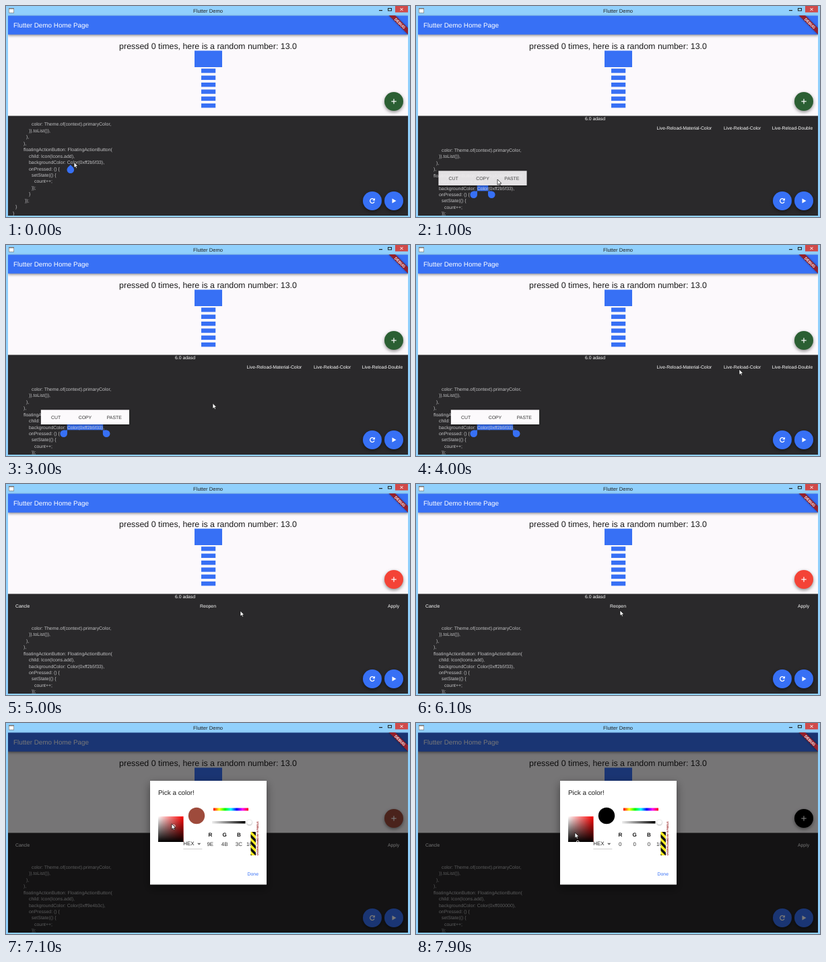
These frames come from a looping animation (600x314 px, 8000 ms). An HTML page with a canvas:

```html
<!DOCTYPE html>
<html>
<head>
<meta charset="utf-8">
<style>
html, body { margin: 0; overflow: hidden; }
canvas { display: block; }
</style>
</head>
<body>
<canvas id="c" width="600" height="314"></canvas>
<script>
const g = document.getElementById('c').getContext('2d');
const BLUE = '#3770f5', FRAME = '#91d0fc', SANS = '"Liberation Sans", Arial, sans-serif';
const PITCH = 9.43, RED = [0.78, 0.957];

// [time, x, y] points, linear in between
const MOUSE = [[0, 101, 232.5], [900, 101, 232.5], [1000, 121, 258], [1300, 113, 280], [1700, 133, 281],
  [1800, 135, 281], [2000, 144, 281], [2200, 146, 281], [2600, 146, 281], [3400, 468, 190], [3500, 470, 190],
  [3800, 480, 185], [4400, 480, 185], [5200, 304, 190], [5500, 303, 188], [6100, 303, 188], [6200, 300, 200.5],
  [6300, 297, 198], [6700, 252, 144], [7100, 246, 150], [7400, 246, 150], [7900, 236, 163]];
// saturation and value while dragging in the palette
const PICK = [[6700, ...RED], [7100, 0.62, 0.62], [7400, 0.62, 0.62], [7800, 0.38, 0], [8000, 0.38, 0]];

const CODE = [
  [38, 'color: Theme.of(context).primaryColor,'], [34, ')).toList()),'], [30, '),'], [26, '),'],
  [26, 'floatingActionButton: FloatingActionButton('], [34, 'child: Icon(Icons.add),'],
  [34, 'backgroundColor: Color(0xff'], [34, 'onPressed: () {'], [38, 'setState(() {'], [42, 'count++;'],
  [38, '});'], [34, '}'], [28, '});'], [14, '}'], [10, '}']];

function along(path, t) {
  let i = 1;
  while (i < path.length - 1 && path[i][0] < t) i++;
  const a = path[i - 1], b = path[i];
  const k = Math.min(1, Math.max(0, (t - a[0]) / (b[0] - a[0])));
  return [a[1] + (b[1] - a[1]) * k, a[2] + (b[2] - a[2]) * k];
}

function rect(x, y, w, h, color) {
  g.fillStyle = color;
  g.fillRect(x, y, w, h);
}

function text(s, x, y, size, color, align = 'left', weight = '') {
  g.font = `${weight} ${size}px ${SANS}`;
  g.textAlign = align;
  g.fillStyle = color;
  g.fillText(s, x, y + size * 0.36);
}

function disc(x, y, r, color) {
  g.fillStyle = color;
  g.beginPath();
  g.arc(x, y, r, 0, 7);
  g.fill();
}

function poly(points, color) {
  g.fillStyle = color;
  g.beginPath();
  points.forEach(p => g.lineTo(...p));
  g.closePath();
  g.fill();
}

function line(points, color, width) {
  g.strokeStyle = color;
  g.lineWidth = width;
  g.beginPath();
  points.forEach(p => g.lineTo(...p));
  g.stroke();
}

function shadowed(blur, dy, draw) {
  g.save();
  g.shadowColor = 'rgba(0,0,0,.45)';
  g.shadowBlur = blur;
  g.shadowOffsetY = dy;
  draw();
  g.restore();
}

const fab = (x, y, color) => shadowed(5, 2, () => disc(x, y, 14, color));

function windowFrame() {
  rect(0, 0, 600, 314, FRAME);
  rect(4, 3, 8, 7.5, '#777');
  rect(4.7, 4.6, 6.6, 5.2, '#fff');
  text('Flutter Demo', 300, 7, 7.6, '#222', 'center');
  rect(554, 6, 5, 1.2, '#222');
  g.strokeStyle = '#222';
  g.lineWidth = 1;
  g.strokeRect(567.5, 3.5, 5, 3.5);
  rect(578, 0, 19, 9.5, '#d04a4a');
  line([[585.5, 3], [589.5, 7]], '#fff', 1);
  line([[589.5, 3], [585.5, 7]], '#fff', 1);
}

function banner() {
  g.save();
  g.beginPath();
  g.rect(3, 14, 594, 298);
  g.clip();
  g.translate(597, 14);
  g.rotate(Math.PI / 4);
  shadowed(3, 0, () => rect(-20, 13.5, 40, 6.5, '#94202c'));
  text('DEBUG', 0, 16.8, 5.6, '#fff', 'center', 'bold');
  g.restore();
}

function page(fabColor) {
  rect(3, 42, 594, 122, '#fcf9fc');
  shadowed(4, 1, () => rect(3, 14.5, 594, 28, BLUE));
  rect(0, 0, 3, 60, FRAME);
  rect(597, 10, 3, 50, FRAME);
  text('Flutter Demo Home Page', 11, 28.8, 9.9, '#fff');
  text('pressed 0 times, here is a random number: 13.0', 300, 59.5, 12.4, '#1c1c1c', 'center');
  rect(280, 66.5, 41, 24.5, BLUE);
  for (let i = 0; i < 6; i++) rect(290, 93.2 + i * 10.37, 21.2, 6.4, BLUE);
  fab(576, 142, fabColor);
  rect(572.3, 141.4, 7.4, 1.2, '#fff');
  rect(575.4, 138.3, 1.2, 7.4, '#fff');
}

// teardrop handle; side -1, 0, 1: left end, caret, right end
function handle(x, y, side) {
  disc(x, y, 5.3, BLUE);
  if (side) rect(side < 0 ? x : x - 5.3, y - 5.3, 5.3, 5.3, BLUE);
  else poly([[x, y - 7.5], [x + 4.2, y - 3.2], [x - 4.2, y - 3.2]], BLUE);
}

function editor(t, hex) {
  const scrolled = t >= 400, selecting = scrolled && t < 4100;
  const top = scrolled ? 214.5 : 176;
  rect(3, 163.5, 594, 148.5, '#2a292b');
  g.save();
  g.beginPath();
  g.rect(3, 163.5, 594, 148.5);
  g.clip();
  g.font = `6.94px ${SANS}`;
  const start = 34 + g.measureText('backgroundColor: ').width;
  const literal = `Color(0xff${hex})`;
  let end = start;
  if (selecting) {
    const dragged = Math.round((along(MOUSE, t)[0] - 115) / 29 * 11);
    const count = t < 1400 ? 5 : t < 2100 ? 5 + Math.max(0, dragged) : 17;
    end += g.measureText(literal.slice(0, count)).width;
    rect(start, 266.3, end - start, 9, BLUE);
  }
  CODE.forEach(([x, s], i) => {
    text(i === 6 ? s + hex + '),' : s, x, top + i * PITCH, 6.94, '#c2c2c4');
  });
  if (selecting) {
    handle(start - 5, 280.8, -1);
    handle(end + 5, 280.8, 1);
  } else if (!scrolled) {
    handle(95.8, 243.7, 0);
  }
  g.restore();

  if (scrolled) text('6.0 adasd', 251, 167.5, 6.85, '#fff');
  if (selecting) {
    text('Live-Reload-Material-Color', 357.5, 181.3, 6.85, '#fff');
    text('Live-Reload-Color', 457, 181.3, 6.85, '#fff');
    text('Live-Reload-Double', 528.7, 181.3, 6.85, '#fff');
    g.globalAlpha = Math.max(0, Math.min(1, (t - 880) / 135));
    toolbar((start + end) / 2);
    g.globalAlpha = 1;
  } else if (scrolled) {
    text('Cancle', 14, 181.3, 6.85, '#fff');
    text('Reopen', 300, 181.3, 6.85, '#fff', 'center');
    text('Apply', 567, 181.3, 6.85, '#fff');
  }

  fab(544, 290, BLUE);
  g.strokeStyle = '#fff';
  g.lineWidth = 1.3;
  g.beginPath();
  g.arc(544, 290, 3.3, 0.4, 5.4);
  g.stroke();
  poly([[548, 285.8], [548, 289.6], [544.2, 289.6]], '#fff');
  fab(576, 290, BLUE);
  poly([[573.5, 286.5], [579.5, 290], [573.5, 293.5]], '#fff');
}

function toolbar(x) {
  shadowed(3, 1, () => rect(x - 65.6, 245.3, 131.2, 21.7, '#fcfafc'));
  ['CUT', 'COPY', 'PASTE'].forEach((s, i) => text(s, x + (i - 1) * 43.4, 256.3, 6.9, '#333', 'center'));
}

function gradient(x, y, w, h, dx, dy, colors) {
  const f = g.createLinearGradient(x, y, x + dx, y + dy);
  colors.forEach((c, i) => f.addColorStop(i / (colors.length - 1), c));
  rect(x, y, w, h, f);
}

function overflowMark() {
  g.save();
  g.beginPath();
  g.rect(363.5, 162, 7.5, 35);
  g.clip();
  rect(363, 162, 8, 35, '#f8ee20');
  for (let y = 155; y < 200; y += 9.9) {
    poly([[363, y], [371, y + 8], [371, y + 13], [363, y + 5]], '#111');
  }
  g.restore();
  g.save();
  g.translate(373.6, 197);
  g.rotate(-Math.PI / 2);
  text('OVERFLOWED BY 9 PIXELS', 0, 0, 3.75, '#901010', 'left', 'bold');
  g.restore();
}

function dialog(rgb, color, [s, v]) {
  shadowed(12, 5, () => rect(214, 86, 173, 154.5, '#fff'));
  text('Pick a color!', 226, 103.4, 9.9, '#1c1c1c');
  gradient(226, 139, 37.5, 38, 37.5, 0, ['#fff', '#f00']);
  gradient(226, 139, 37.5, 38, 0, 38, ['rgba(0,0,0,0)', '#000']);
  g.strokeStyle = '#fff';
  g.lineWidth = 0.9;
  g.beginPath();
  g.arc(226 + s * 37.5, 139 + (1 - v) * 38, 1.9, 0, 7);
  g.stroke();
  disc(283, 138, 12.2, color);
  gradient(308, 126.5, 52, 4, 52, 0, ['#f00', '#ff0', '#0f0', '#0ff', '#00f', '#f0f', '#f00']);
  gradient(306, 146, 49.5, 3.6, 49.5, 0, ['#eee', '#000']);
  shadowed(2, 0.5, () => disc(361.5, 147.8, 3.6, '#fff'));
  text('HEX', 263.3, 179.3, 7.9, '#222');
  poly([[284, 178.7], [289.4, 178.7], [286.7, 181.5]], '#666');
  rect(263.3, 187, 28, 0.7, '#bbb');
  ['R', 'G', 'B'].forEach((name, i) => {
    const x = 303.3 + i * 21.3;
    text(name, x, 166.6, 8, '#111', 'center', 'bold');
    text(rgb[i].toString(16).toUpperCase(), x, 180.1, 7.9, '#333', 'center');
  });
  text('100', 357, 180.1, 7.9, '#333');
  overflowMark();
  text('Done', 358.5, 225, 6.9, BLUE);
}

function pointer([x, y]) {
  const shape = [[0, 0], [0, 8.2], [1.9, 6.5], [3.1, 9.2], [4.5, 8.6], [3.3, 6], [5.9, 6]];
  const at = shape.map(p => [x + p[0], y + p[1]]);
  poly(at, '#fff');
  line([...at, at[0]], '#111', 0.7);
}

function draw(t) {
  const picking = t >= 6800;
  const sv = picking ? along(PICK, t) : RED;
  const low = sv[1] * (1 - sv[0]);
  const rgb = picking ? [sv[1], low * 1.25, low].map(c => Math.round(c * 255)) : [0xf4, 0x43, 0x36];
  const color = `rgb(${rgb})`;
  const hex = picking ? rgb.map(c => c.toString(16).padStart(2, '0')).join('') : '2b5f33';
  windowFrame();
  page(t < 4100 ? '#2b5f33' : color);
  editor(t, hex);
  if (t >= 6200) {
    rect(3, 14.5, 594, 297.5, 'rgba(0,0,0,.53)');
    dialog(rgb, color, sv);
  }
  banner();
  pointer(along(MOUSE, t));
}

function tick(now) {
  draw(Math.floor(now % 8000 / 100) * 100);
  requestAnimationFrame(tick);
}

g.textRendering = 'geometricPrecision';
requestAnimationFrame(tick);
</script>
</body>
</html>
```
